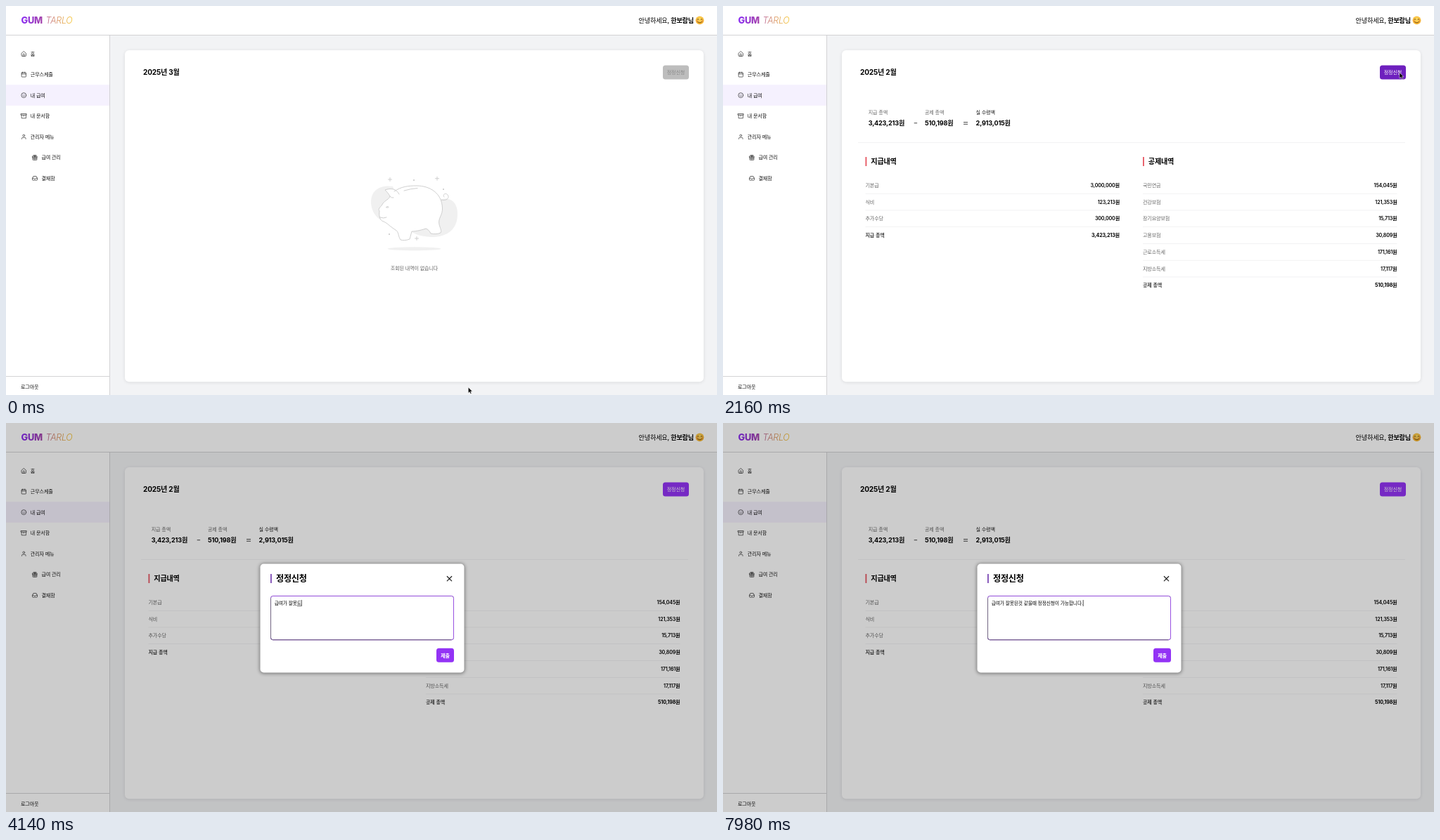
An HTML page for the animation above (8 s loop, 1011x554 px).

```html
<!DOCTYPE html>
<html lang="ko">
<head>
<meta charset="utf-8">
<style>
html, body { margin: 0; width: 100%; height: 100%; overflow: hidden; background: #f2f3f5; }
svg { display: block; }
text { font-family: Inter, "Noto Sans CJK KR", "Noto Sans CJK", "Noto Sans", sans-serif; letter-spacing: -.02em; white-space: pre; }
.icon { fill: none; stroke: #222; stroke-width: 1.9; stroke-linecap: round; stroke-linejoin: round; }
</style>
</head>
<body>
<svg id="stage" width="1011" height="554" viewBox="0 0 1011 554">
  <defs>
    <linearGradient id="brand" gradientUnits="userSpaceOnUse" x1="22" y1="0" x2="95" y2="0">
      <stop stop-color="#8a2df2"/><stop offset=".4" stop-color="#a545ad"/>
      <stop offset=".6" stop-color="#cf8278"/><stop offset="1" stop-color="#f6c62c"/>
    </linearGradient>
    <radialGradient id="face" cy=".4"><stop stop-color="#ffe06a"/><stop offset="1" stop-color="#f5b32e"/></radialGradient>
    <filter id="soft" x="-10%" y="-10%" width="120%" height="120%"><feGaussianBlur stdDeviation="2.5"/></filter>
  </defs>
</svg>
<script>
const LOOP = 8000;
const stage = document.getElementById('stage');
const $ = id => document.getElementById(id);

// Text is placed by its vertical centre; s is the nominal size.
const text = (x, cy, str, { s = 7.37, w = 400, c = '#111', end, mid, id = '', extra = '' } = {}) =>
  `<text ${id && `id="${id}"`} x="${x}" y="${(cy + s * .35).toFixed(2)}" font-size="${(s * .96).toFixed(2)}"
    font-weight="${w}" fill="${c}" text-anchor="${end ? 'end' : mid ? 'middle' : 'start'}" ${extra}>${str}</text>`;
const rect = (x, y, w, h, fill, extra = '') =>
  `<rect x="${x}" y="${y}" width="${w}" height="${h}" fill="${fill}" ${extra}/>`;
const icon = (cx, cy, d) =>
  `<path class="icon" transform="translate(${cx - 4.2} ${cy - 4.2}) scale(.35)" d="${d}"/>`;

const menu = [
  ['홈', 'M3 10l9-8 9 8v10a2 2 0 0 1-2 2H5a2 2 0 0 1-2-2zM9 22v-7a3 3 0 0 1 6 0v7'],
  ['근무스케줄', 'M5 4h14a2 2 0 0 1 2 2v14a2 2 0 0 1-2 2H5a2 2 0 0 1-2-2V6a2 2 0 0 1 2-2zM16 2v4M8 2v4M3 10h18'],
  ['내 급여', 'M22 12a10 10 0 1 1-20 0a10 10 0 1 1 20 0M8 14s1.5 2 4 2 4-2 4-2M9 9h.01M15 9h.01'],
  ['내 문서함', 'M1 3h22v5H1zM3 8v13h18V8M10 12h4'],
  ['관리자 메뉴', 'M20 21v-2a4 4 0 0 0-4-4H8a4 4 0 0 0-4 4v2M16 7a4 4 0 1 1-8 0a4 4 0 1 1 8 0'],
  ['급여 관리', 'M3 7h18v5H3zM4 12v10h16V12M12 7v15M12 7H7.5a2.5 2.5 0 1 1 2.5-5c2 0 2 5 2 5s0-5 2-5a2.5 2.5 0 1 1 2.5 5zM4 16h16'],
  ['결재함', 'M22 12h-6l-2 3h-4l-2-3H2M5.5 5L2 12v6a2 2 0 0 0 2 2h16a2 2 0 0 0 2-2v-6l-3.5-7z'],
];

const sidebar = () => menu.map(([label, d], i) => {
  const x = i > 4 ? 41 : 25.3, y = 68 + i * 29.55;
  return icon(x, y, d) + text(x + 9.5, y, label, { w: 500 });
}).join('');

const face = `<circle cx="986.5" cy="20.3" r="5.9" fill="url(#face)"/>
  <g fill="none" stroke="#6b3f10" stroke-width=".9" stroke-linecap="round">
    <path d="M983 19.2q1.2-1.6 2.2 0M987.8 19.2q1.2-1.6 2.2 0M983.3 22.3q3.2 3.2 6.4 0"/></g>
  <g fill="#f08a4b" opacity=".5"><circle cx="982.7" cy="21.3" r="1.2"/><circle cx="990.3" cy="21.3" r="1.2"/></g>`;

const frame = () =>
  rect(0, 0, 1011, 554, '#f2f3f5') + rect(0, 0, 1011, 41, '#fff') + rect(0, 41, 147.5, 513, '#fff') +
  rect(0, 112.2, 147.5, 29.6, '#f5f1fe') +
  rect(0, 41, 1011, .9, '#cfcfd1') + rect(147, 41, .9, 513, '#cfcfd1') + rect(0, 527, 147, .9, '#cfcfd1') +
  text(21.5, 20.5, 'GUM', { s: 13.4, w: 800, c: 'url(#brand)' }) +
  text(56.5, 20.5, 'TARLO', { s: 13, w: 300, c: 'url(#brand)', extra: 'font-style="italic"' }) +
  text(978, 20.3, '안녕하세요, <tspan font-weight="700">한보람님</tspan>', { s: 9.48, w: 500, c: '#000', end: 1 }) +
  face + sidebar() + text(21, 542.5, '로그아웃', { w: 500 }) +
  rect(169, 64, 823, 472, '#000', 'rx="6" opacity=".1" filter="url(#soft)"') +
  rect(169, 63, 823, 472.3, '#fff', 'rx="6"') +
  text(195, 94.5, '', { s: 10.53, w: 700, c: '#000', id: 'month' }) +
  rect(934, 84.4, 37, 20, '#bdbdbd', 'rx="3.5" id="fix"') +
  text(952.5, 94.5, '정정신청', { w: 500, mid: 1, id: 'fixLabel' });

const plus = (x, y) => `M${x - 2.5} ${y}h5M${x} ${y - 2.5}v5`;
const emptyView = () => `<g id="empty">
  <g fill="#f0f0f0">
    <path d="M550 257C530 254 519 264 519 279C519 293 528 304 537 306L562 290Z"/>
    <path d="M620 275C636 272 642 284 642 296C642 318 628 328 608 329C596 329 584 327 576 321L600 290Z"/>
    <ellipse cx="580.5" cy="345.7" rx="38" ry="2.5"/>
  </g>
  <g fill="none" stroke="#cacaca" stroke-width=".9" stroke-linecap="round" stroke-linejoin="round">
    <path fill="#fff" d="M552 264C562 257 572 256 584 256C602 256 620 266 620.5 288C621 298 614 302 616 311
      C617 316 620 320 618 323C614 325 608 325 604 324C602 320 600 318 597 317C588 320 581 321 577 321
      L574 332C569 334 564 334 561 333C557 327 559 322 554 319C546 314 542 309 537 307C532 306 530 300 531 292
      C528 288 534 286 536 281C539 277 545 275 546 271C544 267 541 264 539 262C547 259 555 260 559 268"/>
    <path d="M566 263Q576 260 585 259.5M619 276C627 278 631 273 628 269C625 265 620 269 623 272M532 301Q537 303 541 301
      M540.500 286.500q1.500-2 3.500-.5M541 287h2.500M546 271q2 3 5 2"/>
    <path d="${plus(546, 247)}${plus(613, 245.7)}${plus(584, 331)}"/>
  </g>
  <g fill="#c4c4c4"><circle cx="580" cy="248" r="1"/><circle cx="622" cy="261" r="1"/><circle cx="545" cy="325" r="1"/></g>
  ${text(580.5, 373, '조회된 내역이 없습니다', { c: '#666', mid: 1 })}</g>`;

const table = (x, title, rows) =>
  rect(x, 215, 1.8, 13, '#e65560') + text(x + 7.8, 221.7, title, { s: 10.53, w: 700, c: '#000' }) +
  rows.map(([label, value], i) => {
    const y = 255.3 + i * 23.75, last = i === rows.length - 1;
    return text(x, y, label, { c: last ? '#444' : '#666', w: last ? 600 : 400 }) +
      text(x + 361.5, y, value + '원', { w: last ? 700 : 600, c: '#000', end: 1 }) +
      (last ? '' : rect(x, y + 11.6, 361.5, .6, '#e9e9ec'));
  }).join('');

const payView = () => {
  const big = { s: 9.48, w: 700, c: '#000' };
  return `<g id="pay">` +
    text(206.7, 151, '지급 총액', { c: '#666' }) + text(287, 151, '공제 총액', { c: '#666' }) +
    text(359.6, 151, '실 수령액', { w: 500 }) +
    text(206.7, 166.3, '3,423,213원', big) + text(287, 166.3, '510,198원', big) + text(359.6, 166.3, '2,913,015원', big) +
    rect(271.7, 166.3, 4.4, .9, '#333') + rect(342, 165.2, 6, .9, '#333') + rect(342, 167.8, 6, .9, '#333') +
    rect(192, 194, 778, .6, '#e9e9ec') +
    table(202.5, '지급내역', [['기본급', '3,000,000'], ['식비', '123,213'], ['추가수당', '300,000'], ['지급 총액', '3,423,213']]) +
    table(597, '공제내역', [['국민연금', '154,045'], ['건강보험', '121,353'], ['장기요양보험', '15,713'], ['고용보험', '30,809'],
      ['근로소득세', '171,161'], ['지방소득세', '17,117'], ['공제 총액', '510,198']]) + `</g>`;
};

const modal = () => `<g id="modal">` + rect(0, 0, 1011, 554, '#000', 'opacity=".2"') +
  rect(360.500, 200, 292, 157, '#000', 'rx="6" opacity=".4" filter="url(#soft)"') +
  rect(361.5, 200.5, 290, 155, '#fff', 'rx="5"') +
  rect(376, 215, 1.8, 13, '#7d4bb5') + text(384, 221.7, '정정신청', { s: 12.64, w: 700, c: '#000' }) +
  `<path d="M627.300 218.500l6.400 6.400m0-6.400l-6.400 6.400" stroke="#222" stroke-width="1.2" stroke-linecap="round"/>` +
  rect(376.5, 246.4, 260, 62.4, '#fff', 'rx="3" stroke="#b9b9b9" stroke-width=".9"') +
  `<g id="focus" fill="none" stroke-width=".9"><rect x="376.5" y="246.4" width="260" height="62.4" rx="3" stroke="#9544e6"/>
    <path d="M376.500 249.400v56.400a3 3 0 0 0 3 3h254" stroke="#6d6878"/></g>` +
  text(381.7, 256.7, '신청 사유를 입력해주세요', { s: 7.02, c: '#757575', id: 'hint' }) +
  text(381.7, 256.7, '', { s: 7.02, c: '#000', id: 'typed' }) +
  rect(0, 260.3, 6, .6, '#000', 'id="under"') + rect(0, 252, .7, 9, '#000', 'id="caret"') +
  rect(612, 320.8, 25, 20, '#9333f5', 'rx="3.5"') + text(624.5, 331, '제출', { w: 600, c: '#fff', mid: 1 }) + `</g>`;

const pointer = `<path id="arrow" d="M0 0V8.200L1.900 6.500 3.200 9.300 4.600 8.700 3.400 5.900H5.900Z" fill="#000" stroke="#fff" stroke-width=".5"/>
  <path id="beam" d="M-1.500-4.500Q0-4.500 0-3.500Q0-4.500 1.500-4.500M0-3.500V3.500M-1.500 4.500Q0 4.500 0 3.500Q0 4.500 1.500 4.500" fill="none" stroke="#222" stroke-width=".8"/>`;

stage.insertAdjacentHTML('beforeend', frame() + emptyView() + payView() + modal() + pointer);

// Typing bursts: first key, last key, settled text, composing states.
const bursts = [
  [3160, 3920, '', 'ㄱ|그|급|급ㅇ|급여|급역|급여가|급여가 |급여가 ㅈ|급여가 자|급여가 잘|급여가 잘ㅁ|급여가 잘모|급여가 잘못'],
  [3980, 4500, '급여가 잘못', 'ㄷ|도|되|된|된ㄱ|된거|된것'],
  [4640, 4680, '급여가 잘못된것', ' '],
  [4880, 5040, '급여가 잘못된것 ', 'ㄱ|가|같'],
  [5320, 5420, '급여가 잘못된것 같', 'ㅇ|으|을'],
  [5580, 5620, '급여가 잘못된것 같을', 'ㄸ|때'],
  [5800, 6300, '급여가 잘못된것 같을때', ' | ㅈ| 저| 정| 정ㅈ| 정저| 정정| 정정ㅅ| 정정시| 정정신'],
  [6620, 7100, '급여가 잘못된것 같을때 정정신', 'ㅊ|처|청|청ㅇ|청이|청이 |청이 ㄱ|청이 가|청이 간'],
  [7240, 7760, '급여가 잘못된것 같을때 정정신청이 ', '가느|가능|가능ㅎ|가능하|가능합|가능합ㄴ|가능합니|가능합닏|가능합니다|가능합니다.'],
].map(([start, end, head, keys]) => ({ start, end, head, keys: keys.split('|') }));

function typedAt(t) {
  const b = bursts.findLast(b => t >= b.start);
  if (!b) return '';
  const last = b.keys.length - 1;
  const k = Math.min(last, Math.floor((t - b.start) / (b.end - b.start) * last + .01));
  return b.head + b.keys[k];
}

const path = [
  [20, 657.3, 543], [660, 226, 96], [840, 226, 96], [1060, 274.5, 143.5],
  [1540, 274.5, 143.5], [2040, 962, 94.8], [2200, 962, 94.8], [2400, 560, 267], [LOOP, 560, 267],
];
const clamp = v => Math.min(1, Math.max(0, v));
const smooth = v => v * v * (3 - 2 * v);
const mix = (a, b, k) => a.map((v, i) => v + (b[i] - v) * k);

function pointerAt(t) {
  const i = Math.max(1, path.findIndex(p => t < p[0]));
  const [a, b] = [path[i - 1], path[i]];
  return mix(a, b, smooth(clamp((t - a[0]) / (b[0] - a[0])))).slice(1);
}

const show = (id, on) => $(id).setAttribute('visibility', on ? 'inherit' : 'hidden');
const rgb = c => `rgb(${c.map(Math.round)})`;

function drawTyping(t) {
  const str = typedAt(t), el = $('typed');
  el.textContent = str;
  show('hint', !str);
  const composing = str && !/[ .]$/.test(str);
  show('under', composing);
  if (composing) $('under').setAttribute('x', el.getStartPositionOfChar(str.length - 1).x);
  $('caret').setAttribute('x', 381.7 + (str ? el.getComputedTextLength() : 0));
  show('caret', t >= 2440 && (t < 2940 || str));
  $('focus').setAttribute('opacity', clamp((t - 2440) / 200));
}

function draw(t) {
  const loaded = t >= 1240, open = t >= 2180;
  $('month').textContent = loaded ? '2025년 2월' : '2025년 3월';
  show('empty', !loaded);
  show('pay', loaded);
  $('modal').style.display = open ? '' : 'none';

  const ready = clamp((t - 1240) / 120);
  const hover = clamp((t - 1980) / 150) - clamp((t - 2200) / 150);
  $('fix').setAttribute('fill', rgb(mix(mix([189, 189, 189], [147, 51, 245], ready), [110, 32, 190], hover)));
  $('fixLabel').setAttribute('fill', rgb(mix([136, 136, 136], [255, 255, 255], ready)));
  if (open) drawTyping(t);

  const [x, y] = pointerAt(t), inField = open && x < 637 && y > 246;
  for (const id of ['arrow', 'beam']) $(id).setAttribute('transform', `translate(${x} ${y})`);
  show('arrow', t < 3160 && !inField);
  show('beam', t < 3160 && inField);
}

const begin = performance.now();
(function tick() {
  draw((performance.now() - begin) % LOOP);
  requestAnimationFrame(tick);
})();
</script>
</body>
</html>
```
